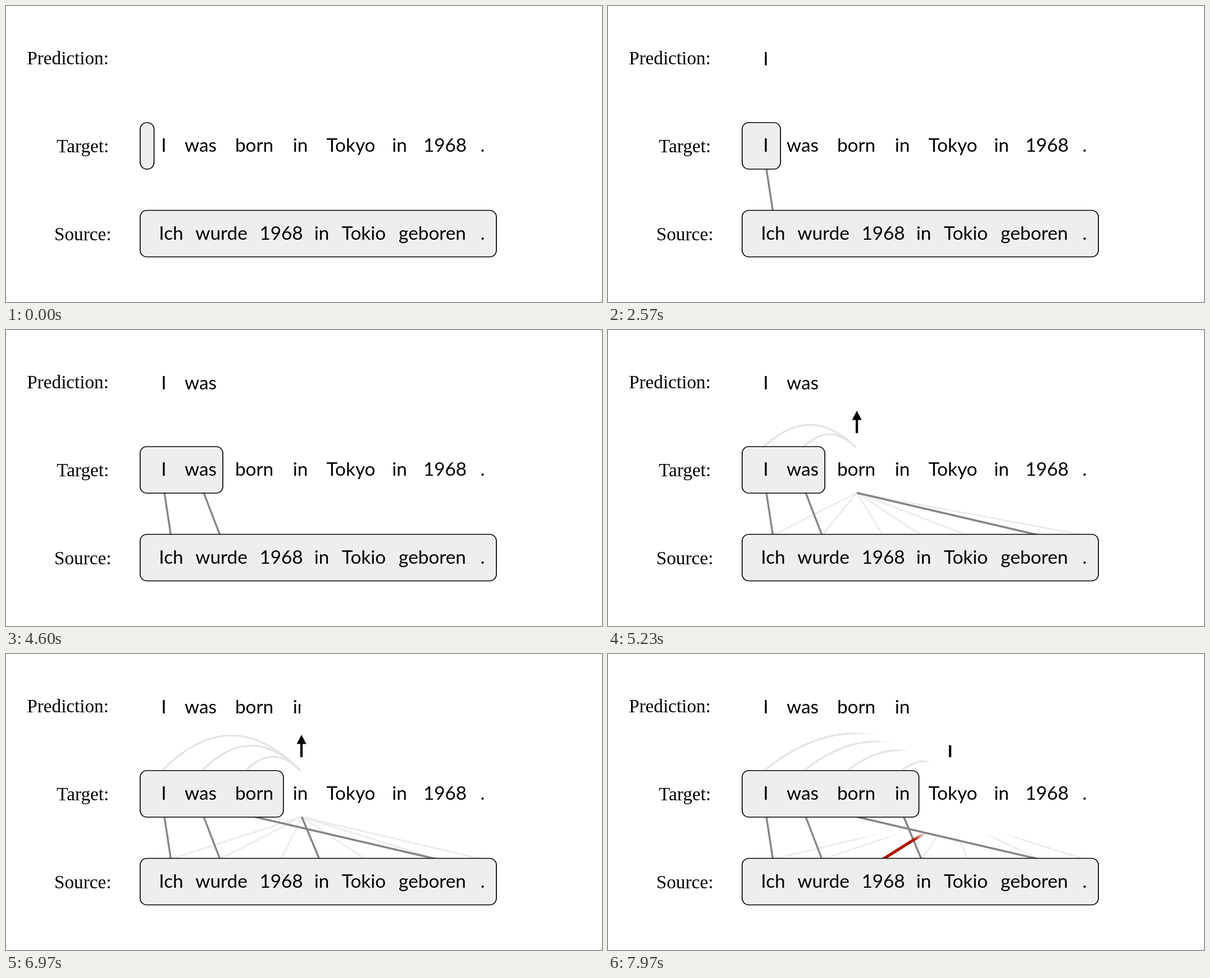
An HTML page with a canvas that plays this animation: 1061 by 528 pixels, repeating every 8000 ms.

```html
<!DOCTYPE html>
<html lang="en">
<head>
<meta charset="utf-8">
<title>Translation attention</title>
<style>
html, body { margin: 0; width: 100%; height: 100%; overflow: hidden; background: #fff; }
canvas { display: block; }
</style>
</head>
<body>
<canvas id="stage" width="1061" height="528"></canvas>
<script>
const ctx = document.getElementById('stage').getContext('2d');
const LOOP = 8000, STEP = 500;

// [text, centre x]
const target = [['I', 281], ['was', 346.5], ['born', 442], ['in', 524], ['Tokyo', 614],
  ['in', 700.5], ['1968', 781.5], ['.', 848.5]];
const source = [['Ich', 294], ['wurde', 383.5], ['1968', 490], ['in', 562], ['Tokio', 637],
  ['geboren', 759], ['.', 848.5]];
const sourceEnds = [293.5, 381, 489.5, 558, 640, 767, 848];
const arcStarts = [278, 349, 427, 523];

// Per predicted word: start of link wipe, word wipe and box growth; line top; strongest link;
// arrow x; arc end and height ratio; word extent; box edge afterwards
const steps = [
  { link: 1050, word: 1570, grow: 2090, x: 282, best: 0, arrow: 281, arcX: 0, lift: 0, from: 271, to: 291, edge: 308.8 },
  { link: 3090, word: 3590, grow: 4090, x: 352, best: 1, arrow: 351.5, arcX: 347, lift: .225, from: 309, to: 384, edge: 386 },
  { link: 4640, word: 5180, grow: 5700, x: 443, best: 5, arrow: 443, arcX: 441, lift: .24, from: 398, to: 486, edge: 493.8 },
  { link: 6210, word: 6710, grow: 7215, x: 526.5, best: 3, arrow: 526, arcX: 525, lift: .255, from: 501, to: 546, edge: 553.5 },
  { link: 7705, word: 8205, grow: 8705, x: 609, best: 2, arrow: 609, arcX: 606, lift: .203, from: 561, to: 667, edge: 670 }
];

const GREY = [133, 133, 133], RED = [176, 20, 0], FAINT = [236, 236, 236],
  ARC = [227, 227, 227], BLACK = [0, 0, 0];

const progress = (t, start) => Math.min(1, Math.max(0, (t - start) / STEP));

// Paint that is revealed from (x0, y0) towards (x1, y1) with a soft edge
function wipe(rgb, p, x0, y0, x1, y1, soft) {
  if (p >= 1) return `rgb(${rgb})`;
  const b = p * (1 + soft), a = b - soft;
  const g = ctx.createLinearGradient(x0 + (x1 - x0) * a, y0 + (y1 - y0) * a,
    x0 + (x1 - x0) * b, y0 + (y1 - y0) * b);
  g.addColorStop(0, `rgb(${rgb})`);
  g.addColorStop(1, `rgba(${rgb},0)`);
  return g;
}

function link(x, endX, rgb, width, p) {
  ctx.strokeStyle = wipe(rgb, p, 0, 366, 0, 290, .17);
  ctx.lineWidth = width;
  ctx.beginPath();
  ctx.moveTo(x, 290.5);
  ctx.lineTo(endX, 366);
  ctx.stroke();
}

function arc(x0, x1, lift, p) {
  ctx.strokeStyle = wipe(ARC, p, x0, 0, x1, 0, .14);
  ctx.lineWidth = 3.2;
  ctx.beginPath();
  ctx.moveTo(x0, 208);
  ctx.quadraticCurveTo((x0 + x1) / 2, 208 - 2 * lift * (x1 - x0), x1, 209);
  ctx.stroke();
}

function arrow(x, p) {
  ctx.fillStyle = wipe(BLACK, p, 0, 184, 0, 144, .02);
  ctx.beginPath();
  ctx.moveTo(x, 144);
  ctx.lineTo(x + 8.5, 160.5);
  ctx.lineTo(x - 8.5, 160.5);
  ctx.fill();
  ctx.fillRect(x - 2.1, 160, 4.2, 24);
}

function box(right, top) {
  ctx.beginPath();
  ctx.roundRect(238.8, top, right - 238.8, 83, 12);
  ctx.fillStyle = '#eee';
  ctx.fill();
  ctx.strokeStyle = '#000';
  ctx.lineWidth = 1.7;
  ctx.stroke();
}

function word([text, x], y, paint = '#000') {
  ctx.fillStyle = paint;
  ctx.fillText(text, x, y);
}

function draw(t) {
  ctx.fillStyle = '#fff';
  ctx.fillRect(0, 0, 1061, 528);

  const begun = steps.filter(s => t > s.link);
  let edge = 263.5;

  begun.forEach((s, i) => {
    const p = progress(t, s.link);
    edge += (s.edge - edge) * progress(t, s.grow);
    if (t >= s.grow) return;
    sourceEnds.forEach((x, k) => k !== s.best && link(s.x, x, FAINT, 3, p));
    arcStarts.slice(0, i).forEach(x => arc(x, s.arcX, s.lift, p));
    arrow(s.arrow, p);
  });
  begun.forEach((s, i) => {
    const wrong = i === 4;
    link(s.x, sourceEnds[s.best], wrong ? RED : GREY, wrong ? 5.2 : 3.4, progress(t, s.link));
  });

  box(edge, 208);
  box(873, 364.5);

  ctx.font = '33.3px Lato, sans-serif';
  ctx.textAlign = 'center';
  target.forEach(w => word(w, 260));
  source.forEach(w => word(w, 417));
  begun.forEach((s, i) => {
    if (t > s.word) word(target[i], 106, wipe(BLACK, progress(t, s.word), s.from, 0, s.to, 0, .12));
  });

  ctx.font = '33.2px "Liberation Serif", serif';
  ctx.textAlign = 'left';
  word(['Prediction:', 37.3], 104);
  word(['Target:', 90.3], 261);
  word(['Source:', 86], 418);
}

function frame() {
  draw(performance.now() % LOOP);
  requestAnimationFrame(frame);
}
frame();
</script>
</body>
</html>
```
